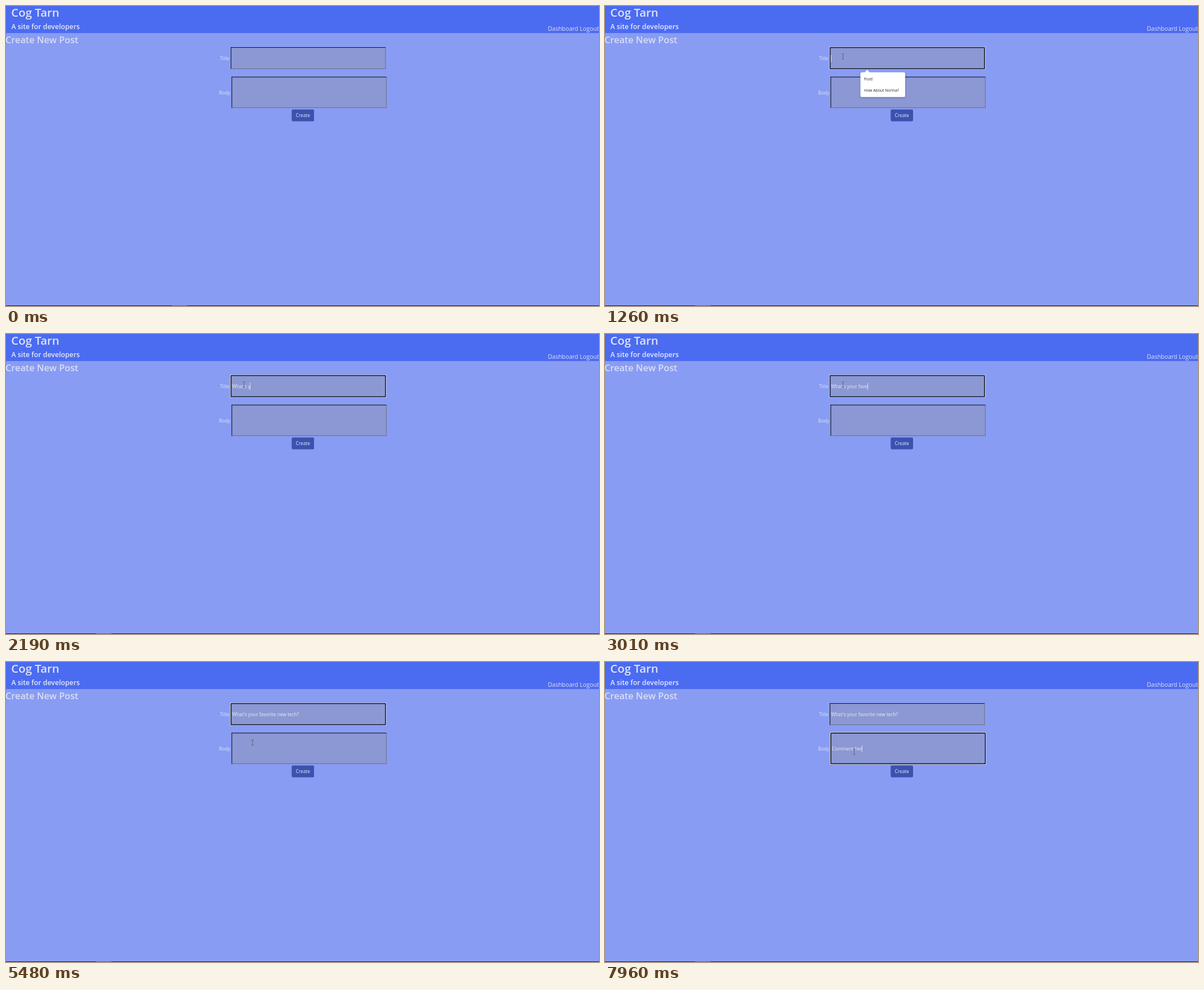
An HTML page with a canvas for the animation above (8000 ms loop, 1053 by 532 pixels).

```html
<!DOCTYPE html>
<html lang="en">
<head>
<meta charset="utf-8">
<title>Create New Post</title>
<style>
  html, body { margin: 0; width: 100%; height: 100%; overflow: hidden; background: #889cf3; }
  canvas { display: block; }
</style>
</head>
<body>
<canvas id="stage" width="1053" height="532"></canvas>
<script>
const ctx = document.getElementById('stage').getContext('2d');
const LOOP = 8000;
const BLINK = 530;
const FOCUS_TITLE = 740;
const FOCUS_BODY = 5680;
const BODY_SIZE = 8.33;
const INK = '#dfe3f6';

// Each burst types its characters evenly between two times.
const burst = (text, from, to) =>
  [...text].map((char, i) => ({ char, time: from + (to - from) * i / Math.max(1, text.length - 1) }));

const titleKeys = [
  ...burst('Wh', 1590, 1660), ...burst("at's", 1740, 2010), ...burst(' y', 2190, 2190),
  ...burst('our', 2340, 2460), ...burst(' favorite', 2610, 3410), ...burst(' new ', 3480, 3940),
  ...burst('tech', 4140, 4470), ...burst('?', 4740, 4740)
];
const bodyKeys = [
  ...burst('Co', 6480, 6550), ...burst('mmen', 6750, 7020), ...burst('t', 7220, 7220),
  ...burst(' her', 7490, 7960)
];

const titleField = { x: 399, y: 73, w: 275.5, h: 39, baseline: 96.2, keys: titleKeys, focus: FOCUS_TITLE, blur: FOCUS_BODY };
const bodyField = { x: 400.5, y: 125.5, w: 275.5, h: 55.5, baseline: 157.2, keys: bodyKeys, focus: FOCUS_BODY, blur: LOOP };

function rect(x, y, w, h, color) {
  ctx.fillStyle = color;
  ctx.fillRect(x, y, w, h);
}

function roundRect(x, y, w, h, radius, color) {
  ctx.fillStyle = color;
  ctx.beginPath();
  ctx.roundRect(x, y, w, h, radius);
  ctx.fill();
}

function text(str, x, y, size, color = INK, weight = 400, align = 'left') {
  ctx.font = `${weight} ${size}px "Open Sans", "Noto Sans", sans-serif`;
  ctx.textAlign = align;
  ctx.fillStyle = color;
  ctx.fillText(str, x, y);
}

function drawField(field, t) {
  const { x, y, w, h, baseline } = field;
  const focused = t >= field.focus && t < field.blur;
  if (focused) {
    roundRect(x - 1, y - 1, w + 2, h + 2, 2, '#f4f6ff');
    roundRect(x - 0.2, y - 0.2, w + 0.4, h + 0.4, 1.5, '#10131f');
    rect(x + 1.4, y + 1.4, w - 2.8, h - 2.8, '#8b98d3');
  } else {
    rect(x, y, w, h, '#71778f');
    rect(x, y, w - 0.6, 1.2, '#14172a');
    rect(x, y, 1.2, h - 0.6, '#14172a');
    rect(x + 1.2, y + 1.2, w - 2.4, h - 2.4, '#8b98d3');
  }

  const typed = field.keys.filter(key => key.time <= t);
  const value = typed.map(key => key.char).join('');
  const left = x + 2.5;
  text(value, left, baseline, BODY_SIZE, '#e9ecf8');

  const lastInput = typed.length ? typed[typed.length - 1].time : field.focus;
  if (focused && Math.floor((t - lastInput) / BLINK) % 2 === 0) {
    rect(Math.floor(left + ctx.measureText(value).width), baseline - 9.2, 0.8, 12, '#eef0fa');
  }
}

function drawSuggestions(t) {
  const closing = Math.max(0, t - 1590);
  const alpha = t < FOCUS_TITLE ? 0 : Math.max(0, 1 - closing / 120);
  if (!alpha) return;
  ctx.save();
  ctx.globalAlpha = alpha;
  if (closing) ctx.translate(1, 1);
  ctx.save();
  ctx.shadowColor = 'rgba(25, 35, 90, .4)';
  ctx.shadowBlur = 3;
  ctx.shadowOffsetY = 1;
  ctx.fillStyle = '#fff';
  ctx.beginPath();
  ctx.roundRect(453.5, 117.5, 79.5, 44, 2.5);
  ctx.moveTo(460.5, 118);
  ctx.lineTo(465.5, 113);
  ctx.lineTo(470.5, 118);
  ctx.fill();
  ctx.restore();
  text('Post!', 460, 132.3, 6.85, '#25262c');
  text('How About Norina?', 460, 152.3, 6.85, '#25262c');
  ctx.restore();
}

function glide(t, start, end, from, to) {
  const p = Math.min(1, Math.max(0, (t - start) / (end - start)));
  const e = p * p * (3 - 2 * p);
  return from.map((v, i) => v + (to[i] - v) * e);
}

function drawPointer(t) {
  const [x, y] = t < 5200
    ? glide(t, 0, 700, [1021, 532], [422.5, 89.5])
    : glide(t, 5140, 5640, [422.5, 89.5], [442.5, 159.5]);
  const overField = [titleField, bodyField].some(f =>
    x >= f.x && x <= f.x + f.w && y >= f.y && y <= f.y + f.h);

  ctx.beginPath();
  if (overField) {
    ctx.strokeStyle = '#5f667f';
    ctx.lineWidth = 1;
    ctx.moveTo(x, y - 4.5);
    ctx.lineTo(x, y + 4.5);
    for (const edge of [-4.5, 4.5]) {
      ctx.moveTo(x - 2, y + edge);
      ctx.lineTo(x + 2, y + edge);
    }
    ctx.stroke();
    return;
  }
  const arrow = [[0, 0], [0, 9], [2.1, 7.1], [3.5, 10.3], [4.8, 9.7], [3.4, 6.6], [6.3, 6.4]];
  arrow.forEach(([dx, dy]) => ctx.lineTo(x + dx, y + dy));
  ctx.closePath();
  ctx.fillStyle = '#fff';
  ctx.fill();
  ctx.strokeStyle = '#1b1f35';
  ctx.lineWidth = 0.6;
  ctx.stroke();
}

function drawPage() {
  rect(0, 0, 1053, 532, '#889cf3');
  rect(0, 0, 1053, 48, '#4b6bf1');
  text('Cog Tarn', 9.3, 18.7, 20.4, INK, 600);
  text('A site for developers', 9.5, 40.7, 12.3, '#e6e9f8', 600);
  text('Dashboard Logout', 1053, 44.3, 10.5, INK, 400, 'right');
  text('Create New Post', -1, 65.6, 16.3, '#d8def6', 600);
  text('Title', 380, 96.2, BODY_SIZE);
  text('Body', 378.5, 157.2, BODY_SIZE);
  roundRect(507.3, 183.5, 39.7, 21, 2, '#3c52b0');
  text('Create', 527.2, 197.3, BODY_SIZE, '#e6e9f8', 400, 'center');
}

function drawTaskbar(t) {
  rect(0, 531, 1053, 1, '#18203f');
  if (t < FOCUS_TITLE) rect(295, 531, 27, 1, '#59627f');
  if (t >= 880) rect(160, 531, 27, 1, '#59627f');
}

function render(now) {
  const t = now % LOOP;
  drawPage();
  drawField(titleField, t);
  drawField(bodyField, t);
  drawSuggestions(t);
  drawPointer(t);
  drawTaskbar(t);
  requestAnimationFrame(() => render(performance.now()));
}

render(performance.now());
</script>
</body>
</html>
```
